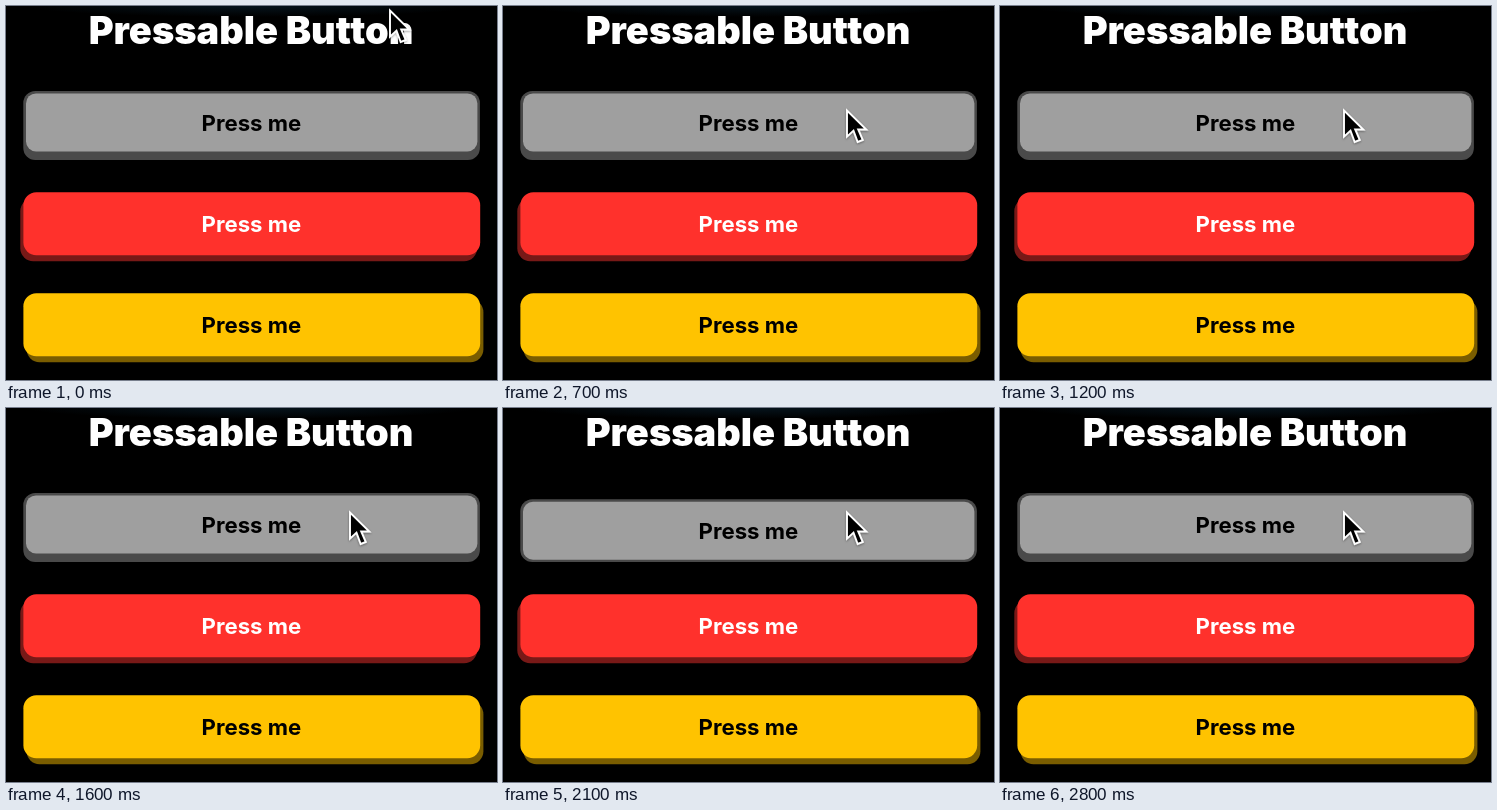
Recreate the animation shown at these times as an HTML page. Size 491 by 374 pixels, loop 3000 ms.

```html
<!DOCTYPE html>
<html lang="en">
<head>
<meta charset="utf-8">
<title>Pressable Button</title>
<style>
  html, body { margin: 0; width: 100%; height: 100%; overflow: hidden; background: #000; }
  svg { display: block; width: 491px; height: 374px; }
  text { font-family: Inter, "Liberation Sans", sans-serif; text-anchor: middle; }
  .title { font-size: 38px; font-weight: 900; fill: #fff; }
  .label { font-size: 22.2px; font-weight: 700; }
</style>
</head>
<body>
<svg viewBox="0 0 491 374">
  <defs>
    <radialGradient id="glow">
      <stop offset="0" stop-color="#06141d"/>
      <stop offset="1" stop-color="#000"/>
    </radialGradient>
    <filter id="shade" x="-30%" y="-30%" width="170%" height="170%">
      <feDropShadow dx="0" dy="1" stdDeviation="1.2" flood-color="#000" flood-opacity=".4"/>
    </filter>
  </defs>
  <rect width="491" height="374" fill="#000"/>
  <ellipse cx="245" cy="0" rx="225" ry="11" fill="url(#glow)"/>
  <text class="title" x="245" y="38">Pressable Button</text>

  <rect id="base" x="17.3" width="456.6" rx="12" fill="#4a4a4a"/>
  <g id="face">
    <rect x="20" y="87.4" width="451.4" height="58" rx="10" fill="#9f9f9f"/>
    <text class="label" x="245.4" y="125">Press me</text>
  </g>

  <rect x="14.3" y="192.2" width="456.8" height="63" rx="13" fill="#781917"/>
  <rect x="17.4" y="186.2" width="456.8" height="63.1" rx="13" fill="#ff312c"/>
  <text class="label" x="245.4" y="226" fill="#fff">Press me</text>

  <rect x="20.6" y="293.2" width="456.8" height="63" rx="13" fill="#7a5d00"/>
  <rect x="17.4" y="287.2" width="456.8" height="63.1" rx="13" fill="#ffc300"/>
  <text class="label" x="245.4" y="327">Press me</text>

  <path id="cursor" d="M1 2.5V28.6L7.5 22.6L11.7 34L16.8 32L12.2 21.5H20.3Z"
    fill="#000" stroke="#fff" stroke-width="1.9" filter="url(#shade)"/>
</svg>
<script>
  const LOOP = 3000, STEP = 100, DEPTH = 6.3;
  const TOP = 85, BOTTOM = 154;

  // Times at which the button flips between up and down
  const flips = [1100, 1200, 1300, 1400, 1500, 1600, 1900, 2000, 2100, 2600, 2700, 2800];

  // Cursor tip, one point per step, resting on the last
  const trail = [[383, 2], [376, 14], [363, 40], [349, 72], [339, 93], [337, 101], [342, 101], [343, 102]];

  const el = id => document.getElementById(id);
  const base = el("base"), face = el("face"), cursor = el("cursor");
  const move = (node, x, y) => node.setAttribute("transform", `translate(${x} ${y})`);

  function draw(ms) {
    const t = Math.floor((ms % LOOP) / STEP) * STEP;
    const down = flips.filter(f => f <= t).length % 2 ? DEPTH : 0;
    base.setAttribute("y", TOP + down);
    base.setAttribute("height", BOTTOM - TOP - down);
    move(face, 0, down);
    move(cursor, ...trail[Math.min(t / STEP, trail.length - 1)]);
  }

  let start;
  function tick(now) {
    start ??= now;
    draw(Math.max(0, now - start));
    requestAnimationFrame(tick);
  }
  draw(0);
  requestAnimationFrame(tick);
</script>
</body>
</html>
```
